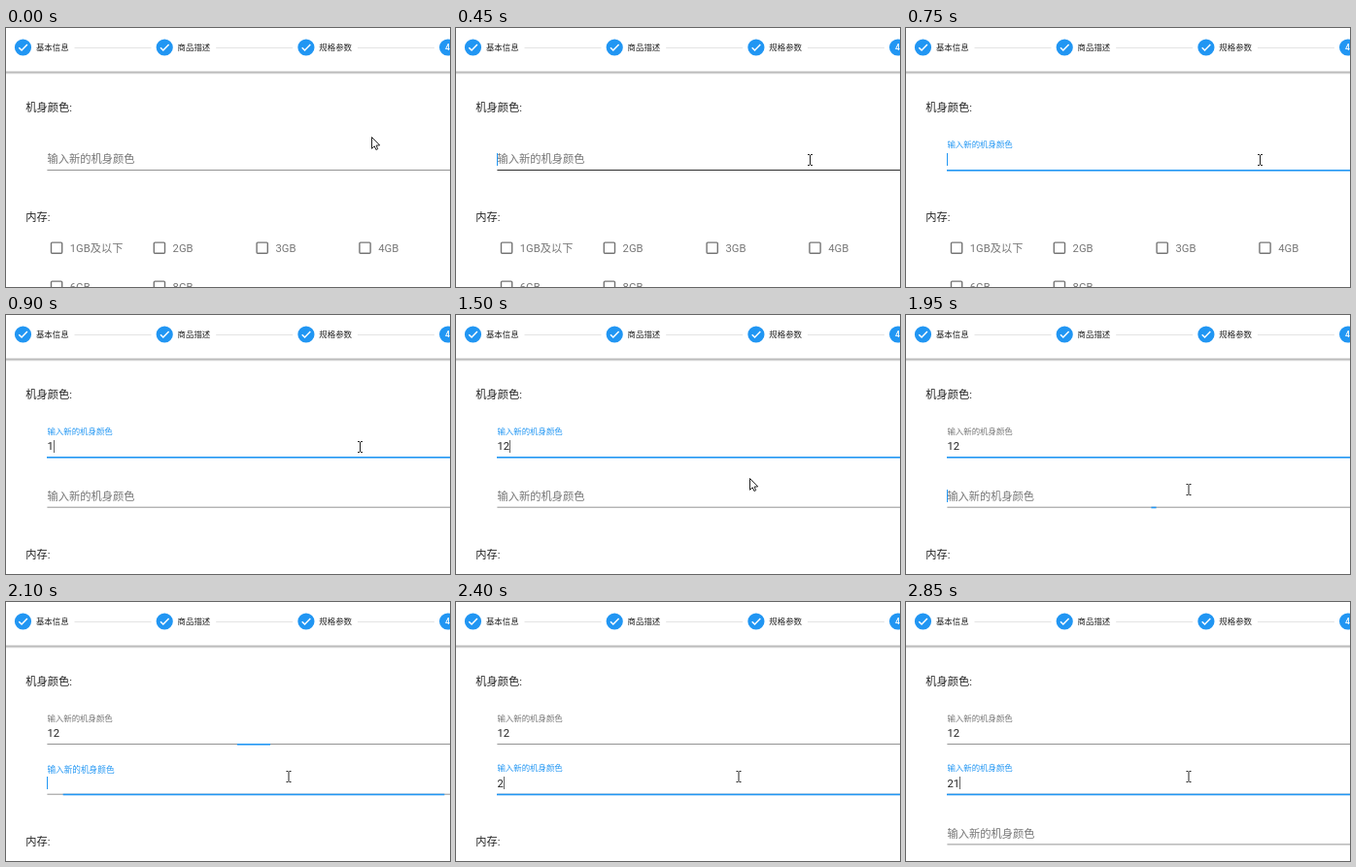
Recreate the animation shown at these times as an HTML page with a canvas. Size 457 by 267 pixels, loop 3300 ms.

```html
<!DOCTYPE html>
<html lang="zh-CN">
<head>
<meta charset="utf-8">
<title>规格参数</title>
<style>
html, body { margin: 0; width: 100%; height: 100%; overflow: hidden; background: #fff; }
canvas { display: block; width: 457px; height: 267px; }
</style>
</head>
<body>
<canvas id="stage"></canvas>
<script>
const W = 457, H = 267, LOOP = 3300, TICK = 150;
const FONT = 'Roboto, "Noto Sans CJK SC", "Noto Sans CJK", "Noto Sans", sans-serif';
const BLUE = '#2196f3', INK = 'rgba(0,0,0,.87)', GRAY = 'rgba(0,0,0,.54)';
const SIZE = 11.25, LEFT = 42.4, MID = 255, HALF = 213, PITCH = 51.7;

const canvas = document.getElementById('stage');
const ctx = canvas.getContext('2d');
const dpr = window.devicePixelRatio || 1;
canvas.width = W * dpr;
canvas.height = H * dpr;

const clamp = x => Math.max(0, Math.min(1, x));
// Field transition: 300 ms, strong ease out
const ease = ms => 1 - Math.pow(1 - clamp(ms / 300), 3.64);

function text(str, x, y, color, size = SIZE, weight = 400) {
  ctx.font = `${weight} ${size}px ${FONT}`;
  ctx.fillStyle = color;
  ctx.fillText(str, x, y);
}

function rect(x, y, w, h, color) {
  ctx.fillStyle = color;
  ctx.fillRect(x, y, w, h);
}

function path(points, close) {
  ctx.beginPath();
  points.forEach(([x, y]) => ctx.lineTo(x, y));
  if (close) ctx.closePath();
}

function header() {
  ['基本信息', '商品描述', '规格参数', ''].forEach((name, i) => {
    const x = 17.5 + i * 145.7;
    ctx.fillStyle = BLUE;
    ctx.beginPath();
    ctx.arc(x, 20, 8.6, 0, Math.PI * 2);
    ctx.fill();
    if (!name) {
      text('4', x - 2.5, 23.2, '#fff', 8.5, 500);
      return;
    }
    path([[x - 4.2, 20.2], [x - 1.4, 23], [x + 4.4, 17]]);
    ctx.strokeStyle = '#fff';
    ctx.lineWidth = 1.5;
    ctx.stroke();
    text(name, x + 13.4, 23.2, INK, 8.44);
    rect(x + 53, 20, 79, 1, '#e4e4e4');
  });
  rect(0, 44, W, 1, '#e6e6e6');
  rect(0, 45, W, 1, '#bdbdbd');
  rect(0, 46, W, 1, '#cfcfcf');
  rect(0, 47, W, 1, '#f3f3f3');
}

function memory(y) {
  text('内存:', 20.3, y, INK);
  const names = ['1GB及以下', '2GB', '3GB', '4GB', '6GB', '8GB'];
  names.forEach((name, i) => {
    const x = 45.8 + (i % 4) * 105.8;
    const top = y + 21.2 + (i > 3 ? 40 : 0);
    ctx.strokeStyle = GRAY;
    ctx.lineWidth = 1.4;
    ctx.beginPath();
    ctx.roundRect(x + .7, top + .7, 11.2, 11.2, 1);
    ctx.stroke();
    text(name, x + 20, top + 10.2, GRAY);
  });
}

function field(index, { lift = 0, active = false, bar = 0, hover = 0, value = '', caret = false }) {
  const dy = index * PITCH;
  const line = 146 + dy;
  rect(LEFT, line, 2 * HALF, 1, `rgba(0,0,0,${.42 + .4 * hover})`);
  if (bar > 0) rect(MID - HALF * bar, line, 2 * HALF * bar, 1.6, BLUE);
  text('输入新的机身颜色', LEFT, 139.3 + dy - 16.6 * lift, active ? BLUE : GRAY, SIZE * (1 - .25 * lift));
  text(value, LEFT, 139.2 + dy, INK);
  if (caret) {
    const x = Math.round(LEFT + ctx.measureText(value).width);
    rect(x, Math.round(128.6 + dy), 1, 13, value ? '#666' : BLUE);
  }
}

function arrow(x, y) {
  const shape = [[0, 0], [0, 11.8], [2.7, 9.3], [4.4, 13], [6.2, 12.2], [4.6, 8.6], [8.2, 8.4]];
  path(shape.map(([a, b]) => [x + a + .5, y + b + .5]), true);
  ctx.fillStyle = '#fff';
  ctx.fill();
  ctx.strokeStyle = '#222';
  ctx.lineWidth = 1;
  ctx.stroke();
}

function beam(x, y) {
  rect(x - .5, y - 5, 1, 10, '#222');
  for (const edge of [-6, 5]) {
    rect(x - 2.5, y + edge, 2, 1, '#222');
    rect(x + .5, y + edge, 2, 1, '#222');
  }
}

function pointer(t) {
  if (t < 150) arrow(376, 112);
  else if (t < 1200) beam(364.5, 136);
  else if (t < 1500) beam(340.5, 145);
  else if (t < 1650) arrow(302, 168);
  else beam(291, 180);
}

function draw(t) {
  const focus1 = 450, focus2 = 1949;
  const first = t >= focus1 && t < focus2;
  const second = t >= focus2;
  const count = t < 900 ? 1 : t < 2550 ? 2 : 3;

  ctx.setTransform(dpr, 0, 0, dpr, 0, 0);
  rect(0, 0, W, H, '#fff');
  header();
  text('机身颜色:', 20.3, 85.8, INK);
  memory(199.2 + (count - 1) * PITCH);

  field(0, {
    lift: ease(t - focus1),
    active: first && t > focus1,
    // The bar opens on focus and closes toward the middle on blur
    bar: second ? 1 - ease(t - focus2 - 1) : ease(t - focus1),
    hover: t < focus2 && t >= 300 ? 1 : 0,
    value: t < 900 ? '' : t < 1350 ? '1' : '12',
    caret: first && t < 1800
  });
  if (count > 1) {
    field(1, {
      lift: ease(t - focus2),
      active: t >= focus2 + TICK,
      bar: ease(t - focus2),
      hover: second ? 0 : clamp((t - 1500) / 300),
      value: t < 2400 ? '' : t < 2850 ? '2' : '21',
      caret: second
    });
  }
  if (count > 2) field(2, {});
  pointer(t);
}

const start = performance.now();
function frame() {
  const t = (performance.now() - start) % LOOP;
  // The screen refreshes in fixed steps
  draw(Math.floor(t / TICK) * TICK);
  requestAnimationFrame(frame);
}
frame();
</script>
</body>
</html>
```
